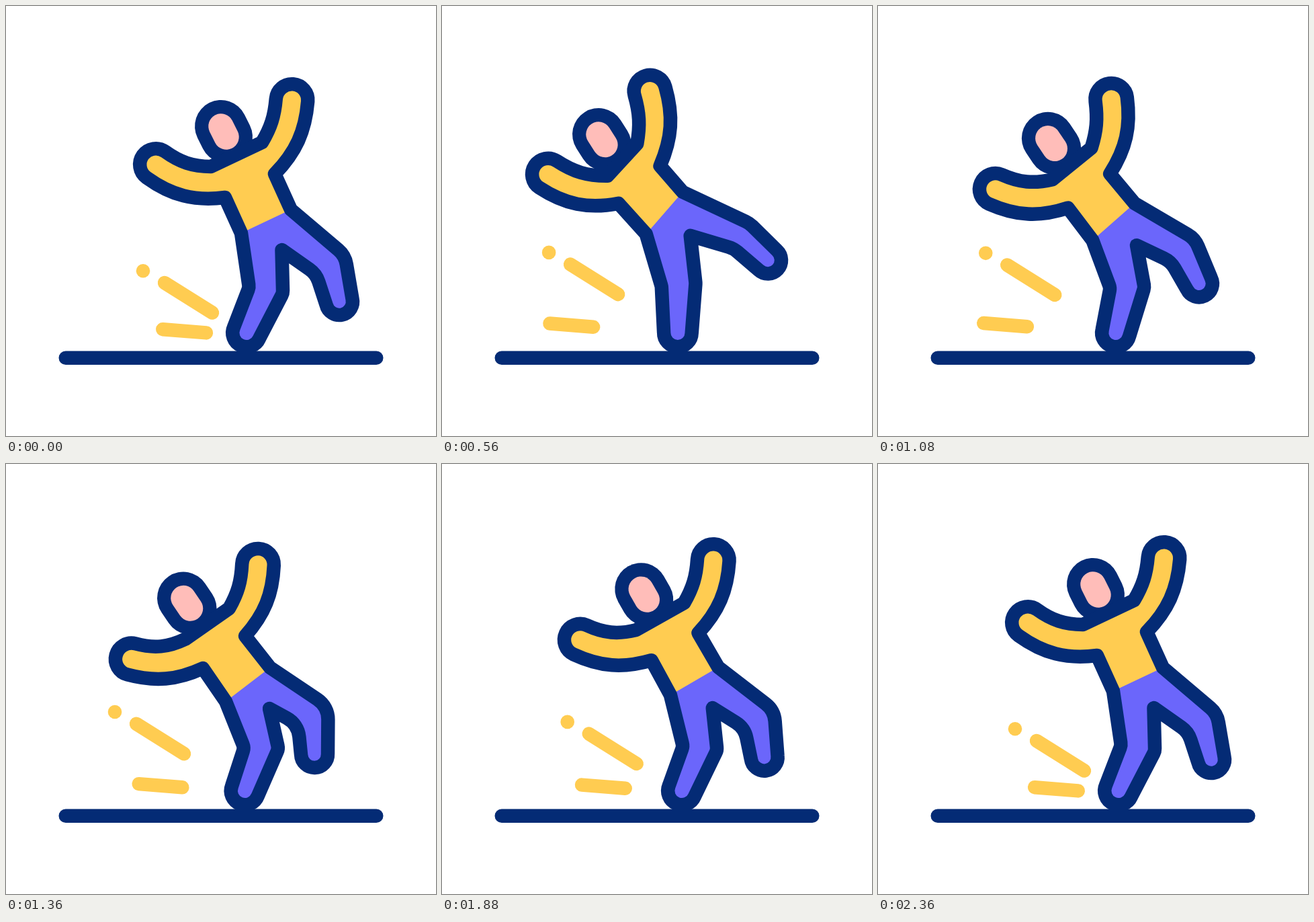
Write an HTML page with a canvas that moves like this. It is 640x640 px and loops after 2400 ms.

```html
<!DOCTYPE html>
<html lang="en">
<head>
<meta charset="utf-8">
<title>Slipping figure</title>
<style>
  html, body { margin: 0; width: 100%; height: 100%; overflow: hidden; background: #fff; }
  canvas { display: block; width: 640px; height: 640px; }
</style>
</head>
<body>
<canvas id="stage" width="640" height="640"></canvas>
<script>
const ctx = document.getElementById('stage').getContext('2d');
const NAVY = '#042b75', YELLOW = '#ffcc51', PURPLE = '#6b66fb', PINK = '#ffbdb9';
const LOOP = 2400, LIMB_LAG = 30, SKID_LAG = 90;
const KEYS = [0, 750, 1350, 2366];
const PIVOT = [355, 490];

// Each joint: upright, leaning back, recovering
const JOINTS = {
  shoulderL: [[305, 239], [243, 254], [267, 260.5]],
  shoulderR: [[381, 203], [285, 206], [332, 215]],
  pitR: [[400, 250], [320, 238], [356, 256]],
  hipR: [[424, 303], [354, 276], [393, 303]],
  kneeB: [[483, 385], [443, 340], [457, 374]],
  crotch: [[410.5, 363], [367, 341], [392, 364]],
  kneeF: [[387, 423], [350, 415], [380, 423]],
  hipL: [[350, 338], [301, 340], [327, 353.5]],
  pitL: [[326, 285], [259, 295], [293, 304]],
  crown: [[320, 179], [228, 192.5], [264, 199.5]],
  chin: [[328, 195], [238, 208], [274.5, 215]]
};
// Limb ends, measured from the shoulder centre or the knee
const HAND_L = [[-92.5, -26], [-97, -22.5], [-93.3, 8.2]];
const HAND_R = [[35, -86.5], [-1, -95], [31, -85.7]];
const FOOT_B = [[13, 55], [41, 34], [2, 58]];
const FOOT_F = [[358, 486.5], [350.5, 486.5], [355.5, 486.5]];
const STREAK = [[0, 0], [-47.5, -29], [-42, -25.3]];
const SKID = [[0, 0], [-87, -10.3], [-35, -5]];
const KNEE_WIDTH = [25.5, 22, 26];

const lerp = (a, b, w) => a + (b - a) * w;
const mid = (a, b) => [(a[0] + b[0]) / 2, (a[1] + b[1]) / 2];
const add = (a, b) => [a[0] + b[0], a[1] + b[1]];
const angle = (a, b) => Math.atan2(b[1] - a[1], b[0] - a[0]);
const dist = (a, b) => Math.hypot(b[0] - a[0], b[1] - a[1]);
const polar = (p, a, r) => [p[0] + r * Math.cos(a), p[1] + r * Math.sin(a)];

// cubic-bezier(.75, 0, .25, 1)
function ease(x) {
  let lo = 0, hi = 1, s = 0.5;
  for (let i = 0; i < 24; i++) {
    s = (lo + hi) / 2;
    const u = 1 - s;
    if (2.25 * s * u * u + 0.75 * s * s * u + s * s * s < x) lo = s; else hi = s;
  }
  return s * s * (3 - 2 * s);
}

function phase(t) {
  t = (t + LOOP) % LOOP;
  for (let i = 0; i < 3; i++) {
    if (t < KEYS[i + 1]) {
      return { from: i, to: (i + 1) % 3, w: ease((t - KEYS[i]) / (KEYS[i + 1] - KEYS[i])) };
    }
  }
  return { from: 0, to: 0, w: 0 };
}

const number = (k, f) => lerp(k[f.from], k[f.to], f.w);
const slide = (k, f) => [0, 1].map(i => lerp(k[f.from][i], k[f.to][i], f.w));

// Moves on an arc around a pivot, turning the short way
function swing(k, f, pivot) {
  const a = k[f.from], b = k[f.to], start = angle(pivot, a);
  const turn = angle(pivot, b) - start;
  return polar(pivot,
    start + Math.atan2(Math.sin(turn), Math.cos(turn)) * f.w,
    lerp(dist(pivot, a), dist(pivot, b), f.w));
}

function arm(path, a, hand, b, bend) {
  const dir = angle(hand, mid(a, b)) + bend, q = Math.PI / 2;
  const s1 = polar(hand, dir + q, 23.8), s2 = polar(hand, dir - q, 23.8);
  const handles = (s, end) => {
    const k = dist(s, end) * 0.38;
    return [polar(s, dir, k), polar(end, 2 * angle(s, end) - dir, -k)];
  };
  const [h1, e1] = handles(s1, a), [h2, e2] = handles(s2, b);
  path.bezierCurveTo(...e1, ...h1, ...s1);
  path.arc(...hand, 23.8, dir + q, dir + 3 * q);
  path.bezierCurveTo(...h2, ...e2, ...b);
}

function leg(path, from, knee, foot, to, half, round, size) {
  const shin = angle(knee, foot), q = Math.PI / 2;
  const across = (angle(mid(from, to), knee) + shin) / 2 - q;
  path.arcTo(...polar(knee, across, half), ...polar(foot, shin - q, size), round);
  path.arc(...foot, size, shin - q, shin + q);
  path.arcTo(...polar(knee, across, -half), ...to, round);
  path.lineTo(...to);
}

function torso(path, j) {
  path.lineTo(...j.pitL);
  arm(path, j.pitL, j.handL, j.shoulderL, 0.35);
  path.lineTo(...j.shoulderR);
  arm(path, j.shoulderR, j.handR, j.pitR, -0.3);
  path.lineTo(...j.hipR);
}

function legs(path, j) {
  leg(path, j.hipR, j.kneeB, j.footB, j.crotch, j.kneeWidth, 36, 20);
  leg(path, j.crotch, j.kneeF, j.footF, j.hipL, 25.5, 15, 20.8);
}

function line(a, b, color, width) {
  ctx.beginPath();
  ctx.moveTo(...a);
  ctx.lineTo(...b);
  ctx.strokeStyle = color;
  ctx.lineWidth = width;
  ctx.stroke();
}

function pose(f, late) {
  const j = {};
  for (const name in JOINTS) j[name] = swing(JOINTS[name], f, PIVOT);
  const hang = (hub, k) => add(hub, swing(k, late, [0, 0]));
  j.handL = hang(mid(j.shoulderL, j.pitL), HAND_L);
  j.handR = hang(mid(j.shoulderR, j.pitR), HAND_R);
  j.footB = hang(j.kneeB, FOOT_B);
  j.footF = slide(FOOT_F, f);
  j.kneeWidth = number(KNEE_WIDTH, f);
  return j;
}

function figure(j) {
  line(j.crown, j.chin, NAVY, 78);
  line(j.crown, j.chin, PINK, 37.5);

  const body = new Path2D(), trousers = new Path2D();
  body.moveTo(...j.hipL);
  torso(body, j);
  legs(body, j);
  body.closePath();
  trousers.moveTo(...j.hipR);
  legs(trousers, j);
  trousers.closePath();

  ctx.fillStyle = YELLOW;
  ctx.fill(body);
  ctx.fillStyle = PURPLE;
  ctx.fill(trousers);
  ctx.strokeStyle = NAVY;
  ctx.lineWidth = 20.5;
  ctx.stroke(body);
}

function marks(f, late) {
  const [x, y] = slide(STREAK, f), [u, v] = slide(SKID, late);
  line([236 + x, 412 + y], [307 + x, 456.5 + y], YELLOW, 20.5);
  line([233.3 + u, 481.2 + v], [298 + u, 486.4 + v], YELLOW, 20.5);
  ctx.beginPath();
  ctx.arc(204 + x, 394.3 + y, 10.3, 0, 2 * Math.PI);
  ctx.fillStyle = YELLOW;
  ctx.fill();
}

function draw(t) {
  ctx.fillStyle = '#fff';
  ctx.fillRect(0, 0, 640, 640);
  const f = phase(t);
  marks(f, phase(t - SKID_LAG));
  figure(pose(f, phase(t - LIMB_LAG)));
  line([88.8, 523.8], [551.2, 523.8], NAVY, 20.6);
}

ctx.lineCap = ctx.lineJoin = 'round';
const start = performance.now();
function tick() {
  draw((performance.now() - start) % LOOP);
  requestAnimationFrame(tick);
}
tick();
</script>
</body>
</html>
```
